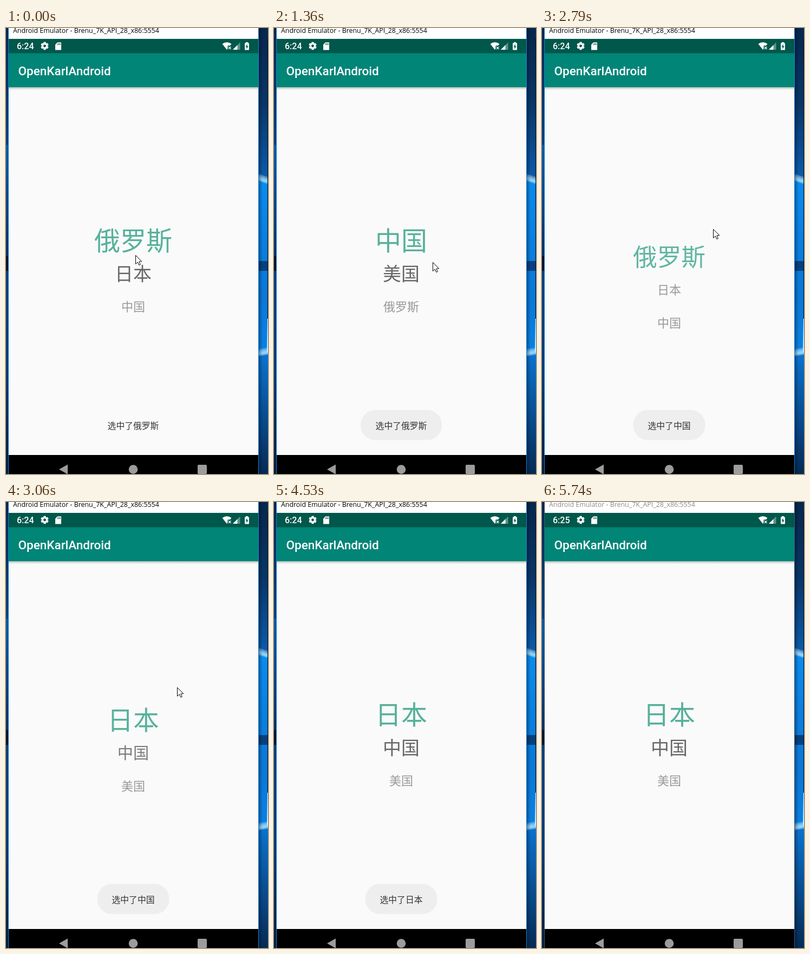
An HTML page with a canvas that plays this animation: 484 px wide and 821 px high, repeating every 6.42 s.

```html
<!DOCTYPE html>
<html lang="zh-CN">
<head>
<meta charset="utf-8">
<title>Wheel picker</title>
<style>
html, body { margin: 0; width: 100%; height: 100%; overflow: hidden; background: #000; }
canvas { display: block; }
</style>
</head>
<body>
<canvas id="stage" width="484" height="821"></canvas>
<script>
const ctx = document.getElementById('stage').getContext('2d');
const LOOP = 6420, STEP = 137.5, LEAD = 26; // the screen refreshes once per STEP ms
const MID = 235, TOP = 391, GAP = 61, REACH = 83;
const CJK = '"Noto Sans CJK SC", "Noto Sans CJK", sans-serif';
const ITEMS = ['俄罗斯', '日本', '中国', '美国'];

// Turning points of the pointer: step, x, y
const PATH = [
  [0, 239, 418], [3, 257, 472], [6, 262, 470], [7, 269, 391], [8, 272, 375],
  [12, 313, 486], [16, 313, 486], [17, 306, 503], [18, 306, 503], [20, 316, 370],
  [22, 316, 341], [24, 319, 492], [28, 319, 492], [31, 398, 785], [33, 398, 840]
];

const ramp = (n, from, to) => Math.min(1, Math.max(0, (n - from) / (to - from)));
const smooth = p => p * p * (3 - 2 * p);
const easeOut = p => 1 - (1 - p) ** 3;

function along(path, n) {
  const i = path.findIndex(k => k[0] > n);
  if (i < 0) return path[path.length - 1].slice(1);
  const [a, ax, ay] = path[i - 1], [b, bx, by] = path[i];
  const p = ramp(n, a, b);
  return [ax + (bx - ax) * p, ay + (by - ay) * p].map(Math.round);
}

function rect(x, y, w, h, fill, r = 0) {
  ctx.fillStyle = fill;
  ctx.beginPath();
  ctx.roundRect(x, y, w, h, r);
  ctx.fill();
}

function poly(fill, ...pts) {
  ctx.beginPath();
  for (let i = 0; i < pts.length; i += 2) ctx.lineTo(pts[i], pts[i + 1]);
  ctx.closePath();
  ctx.fillStyle = fill;
  ctx.fill();
}

function disc(x, y, r, fill) {
  ctx.beginPath();
  ctx.arc(x, y, r, 0, 7);
  ctx.fillStyle = fill;
  ctx.fill();
}

function text(str, x, y, font, fill, align = 'left') {
  ctx.font = font;
  ctx.fillStyle = fill;
  ctx.textAlign = align;
  ctx.fillText(str, x, y);
}

// Evenly spaced colours from (x0, y0) to (x1, y1).
function blend(x0, y0, x1, y1, ...colors) {
  const g = ctx.createLinearGradient(x0, y0, x1, y1);
  colors.forEach((c, i) => g.addColorStop(i / (colors.length - 1), c));
  return g;
}

// Slanted line of light across the right edge of the desktop.
function glow(y0, y1) {
  for (let r = 9; r > 0; r -= 2) {
    poly('rgba(190,236,255,.28)', 466, y0 - r, 484, y1 - r, 484, y1 + r / 2, 466, y0 + r / 2);
  }
}

function desktop() {
  rect(0, 0, 5, 215, blend(0, 0, 0, 215, '#04264f', '#07407c'));
  rect(0, 215, 5, 205, blend(0, 215, 0, 420, '#0d5aa5', '#04305f'));
  rect(0, 420, 5, 27, '#021226');
  rect(0, 447, 5, 374, blend(0, 447, 0, 821, '#064079', '#053a70', '#031b38'));

  rect(466, 0, 18, 280, blend(0, 0, 0, 280, '#06264c', '#083668', '#0b5cae'));
  rect(466, 280, 18, 317, blend(0, 280, 0, 597, '#0a8cf0', '#0a80e2', '#0a78d8', '#0a80e2'));
  rect(466, 597, 18, 224, blend(0, 597, 0, 821, '#0a74d0', '#084f94', '#052a54'));
  rect(466, 429, 18, 18, '#07407f');
  glow(277, 283);
  glow(600, 597);
  rect(466, 0, 8, 821, blend(466, 0, 474, 0, 'rgba(0,0,0,.4)', 'rgba(0,0,0,0)'));
  rect(483, 20, 1, 515, '#05080c');
  poly('#c8efff', 484, 535, 483, 535, 482, 594, 484, 598);
}

function statusIcons() {
  const w = '#fff', bar = '#00574b';
  disc(71.5, 33, 5.6, w);
  for (let i = 0; i < 6; i++) {
    ctx.save();
    ctx.translate(71.5, 33);
    ctx.rotate(i * Math.PI / 3 + Math.PI / 6);
    rect(4, -2.2, 3.2, 4.4, w, .6);
    ctx.restore();
  }
  disc(71.5, 33, 2.4, bar);

  poly(w, 91, 30.5, 95, 26.5, 102, 26.5, 102, 40.5, 91, 40.5);
  for (const x of [95, 97.3, 99.6]) rect(x, 28.3, 1.2, 3, bar);

  ctx.beginPath();
  ctx.moveTo(408, 40);
  ctx.lineTo(399.5, 29.3);
  ctx.quadraticCurveTo(408, 23, 416.5, 29.3);
  ctx.closePath();
  ctx.fillStyle = w;
  ctx.fill();
  rect(409.5, 32.5, 8, 8, bar);
  ctx.strokeStyle = w;
  ctx.lineWidth = 1.3;
  ctx.beginPath();
  ctx.moveTo(411, 34.5); ctx.lineTo(415.5, 39);
  ctx.moveTo(415.5, 34.5); ctx.lineTo(411, 39);
  ctx.stroke();

  poly('#5c9389', 432.5, 26.5, 432.5, 40, 419, 40);
  poly(w, 427.5, 31.5, 427.5, 40, 419, 40);

  rect(441, 27.5, 8, 13, w, 1);
  rect(443.3, 26, 3.4, 2, w);
  poly(bar, 445.6, 29.5, 442.6, 34.8, 444.5, 34.8, 444.5, 38.8, 447.5, 33.4, 445.6, 33.4);
}

function phone(active) {
  rect(4, 0, 463, 821, active ? '#1883d7' : '#3f5a74');
  rect(5, 0, 461, 20, '#fff');
  text('Android Emulator - Brenu_7K_API_28_x86:5554', 13, 9,
    '12.4px "Open Sans", "Noto Sans", sans-serif', active ? '#000' : '#8c8c8c');
  rect(5, 20, 461, 27, '#00574b');
  rect(5, 46.5, 461, 63, '#008577');
  rect(5, 109, 461, 677, '#fafafa');
  rect(5, 109, 461, 5, blend(0, 109, 0, 114, '#b9c0bf', '#fafafa'));
  rect(5, 786, 461, 35, '#000');
  text(active ? '6:24' : '6:25', 20, 39, '500 16px Roboto, sans-serif', '#fff');
  text('OpenKarlAndroid', 22.5, 86.5, '500 22.5px Roboto, sans-serif', '#fff');
  statusIcons();
  const key = '#9c9c9c';
  poly(key, 98, 812.5, 114, 803.5, 114, 821.5);
  disc(235, 812.5, 8.3, key);
  rect(354, 804, 17, 17, key, 2);
}

// Size and opacity fall off with the square of the distance from the top place.
function wheel(scroll) {
  const chosen = Math.round(scroll);
  for (let i = 0; i < 3; i++) {
    const d = (chosen + i - scroll) * GAP;
    const k = Math.max(0, 1 - (d / REACH) ** 2);
    const size = 22 + 26 * k;
    ctx.globalAlpha = .47 + .53 * k;
    text(ITEMS[(chosen + i) % 4], MID, TOP + d + size * .38, size + 'px ' + CJK, i ? '#2c2c2c' : '#57b19b', 'center');
  }
  ctx.globalAlpha = 1;
}

function toast(name, alpha, plate) {
  ctx.globalAlpha = alpha;
  const w = name.length > 2 ? 150 : 133;
  if (plate) rect(MID - w / 2, 703, w, 55.5, '#eee', 27);
  text('选中了' + name, MID, 737.5, '15.8px ' + CJK, '#333', 'center');
  ctx.globalAlpha = 1;
}

function pointer(x, y) {
  ctx.save();
  ctx.translate(x + .5, y + .5);
  poly('#fff', 0, 0, 0, 16, 3.8, 12.5, 6.3, 18, 8.8, 17, 6.4, 11.5, 11.3, 11.3);
  ctx.strokeStyle = '#000';
  ctx.lineWidth = 1;
  ctx.stroke();
  ctx.restore();
}

function draw(now) {
  const n = Math.floor((now % LOOP + LEAD) / STEP);
  desktop();
  phone(n < 36);

  // Two swipes: past two items, then past three.
  wheel(2 * smooth(ramp(n, 5.5, 9)) + 3 * easeOut(ramp(n, 19, 23.8)));

  const second = ramp(n, 10, 14), third = ramp(n, 23, 27), gone = ramp(n, 36, 41);
  toast(ITEMS[0], 1 - second, n > 0);
  toast(ITEMS[2], second * (1 - third), true);
  toast(ITEMS[1], third * (1 - gone), true);
  pointer(...along(PATH, n));
}

const start = performance.now();
function tick() {
  draw(performance.now() - start);
  requestAnimationFrame(tick);
}
tick();
</script>
</body>
</html>
```
